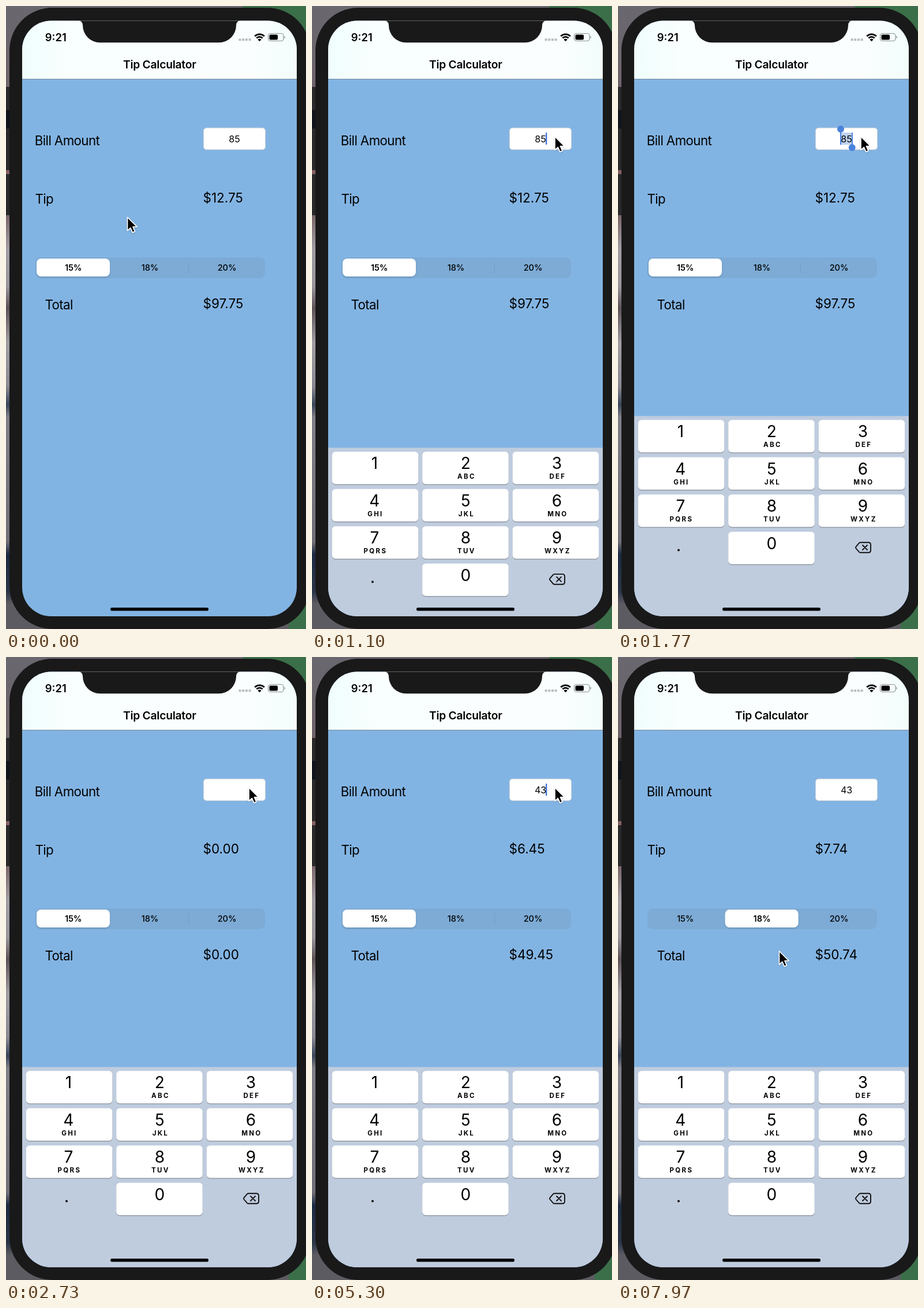
Recreate the animation shown at these times as an HTML page. Size 520 px wide and 1078 px high, loop 8 s.

```html
<!DOCTYPE html>
<html lang="en">
<head>
<meta charset="utf-8">
<title>Tip Calculator</title>
<style>
  html, body { margin: 0; width: 100%; height: 100%; overflow: hidden; }
  svg { display: block; width: 100vw; height: 100vh; font-family: Inter, Roboto, sans-serif; }
  .mid { text-anchor: middle; }
  .label { font-size: 22.3px; letter-spacing: -.6px; }
  .value { font-size: 22.5px; }
  .seg { font-size: 14.6px; font-weight: 500; letter-spacing: -.1px; }
  .seg .on { font-weight: 600; }
  .digit { font-size: 28px; }
  .letters { font-size: 11.5px; font-weight: 700; letter-spacing: 2.3px; }
</style>
</head>
<body>
<svg viewBox="0 0 520 1078">
  <defs>
    <linearGradient id="desk" x2="0" y2="1">
      <stop offset="0" stop-color="#69676f"/>
      <stop offset=".33" stop-color="#765f62"/>
      <stop offset=".39" stop-color="#a19da4"/>
      <stop offset=".45" stop-color="#99959c"/>
      <stop offset=".485" stop-color="#5d5358"/>
      <stop offset=".54" stop-color="#a19da3"/>
      <stop offset=".61" stop-color="#8b8993"/>
      <stop offset=".64" stop-color="#3a465c"/>
      <stop offset=".66" stop-color="#807f88"/>
      <stop offset=".86" stop-color="#706f78"/>
      <stop offset=".88" stop-color="#1c2b42"/>
      <stop offset=".94" stop-color="#2a3547"/>
      <stop offset=".96" stop-color="#5d5b62"/>
      <stop offset="1" stop-color="#5d5b62"/>
    </linearGradient>
    <linearGradient id="bar">
      <stop offset="0" stop-color="#f0fdfd"/>
      <stop offset=".16" stop-color="#f9fefe"/>
      <stop offset=".85" stop-color="#fafefe"/>
      <stop offset="1" stop-color="#f2fdfb"/>
    </linearGradient>
    <clipPath id="screen"><rect x="28" y="25.500" width="476" height="1030.500" rx="50"/></clipPath>
    <filter id="soft" x="-30%" y="-30%" width="160%" height="170%">
      <feDropShadow dx="0" dy="1.500" stdDeviation="1.500" flood-opacity=".16"/>
    </filter>
  </defs>

  <rect width="520" height="1078" fill="url(#desk)"/>
  <path fill="#29292b" d="M0 140H8V362H0z"/>
  <path fill="#10151b" d="M0 180H8V212H0z"/>
  <path fill="#855f61" d="M0 284H8V291H0z"/>
  <path fill="#3b6f49" d="M411 0H520V1078H490V90H411z"/>
  <rect x="6" y="3" width="521" height="1075" rx="74" fill="#191919"/>

  <g clip-path="url(#screen)">
    <rect x="28" y="25" width="476" height="1031" fill="#82b4e3"/>
    <rect x="28" y="25" width="476" height="101.500" fill="url(#bar)"/>
    <path d="M28 126.500H504" stroke="#75899a"/>
    <path fill="#191919" d="M125 25a8 8 0 0 1 8 8a30 30 0 0 0 30 30.300H369a30 30 0 0 0 30-30.300a8 8 0 0 1 8-8z"/>

    <text x="67.800" y="61" font-size="18.400" font-weight="600">9:21</text>
    <path d="M403.500 58.300h22" stroke="#babdbe" stroke-width="4" stroke-dasharray="4 1.700"/>
    <g fill="none" stroke="#000" stroke-width="2.800">
      <path d="M431.200 52.200a11.800 11.800 0 0 1 16.600 0"/>
      <path d="M434.300 55.600a7.400 7.400 0 0 1 10.400 0"/>
    </g>
    <path d="M436.300 58q3.200-2.500 6.400 0l-3.200 3.300z"/>
    <rect x="454.500" y="47.500" width="26.500" height="13" rx="4" fill="none" stroke="#8d9292" stroke-width="1.200"/>
    <rect x="456.500" y="49.500" width="14.500" height="9" rx="2"/>
    <path d="M482.500 51.500q3 2.500 0 5z" fill="#8d9292"/>
    <text class="mid" x="266.300" y="108" font-size="19.200" font-weight="600" letter-spacing="-.2">Tip Calculator</text>

    <text class="label" x="49.800" y="241">Bill Amount</text>
    <text class="label" x="50.500" y="342">Tip</text>
    <text class="label" x="67.500" y="525">Total</text>
    <text class="value" id="tip" x="341.500" y="340"/>
    <text class="value" id="total" x="341.500" y="523"/>

    <rect x="342.500" y="211" width="107" height="37.500" rx="5" fill="#fff" stroke="#d0d3d5"/>
    <rect id="mark" x="386" y="219" width="20" height="21" fill="#bfd2ee"/>
    <text class="mid" id="bill" x="396" y="235.500" font-size="16"/>
    <rect id="caret" y="219" width="2.300" height="21" rx="1" fill="#3f72d8"/>
    <g id="handles" fill="#4a82dc">
      <path d="M385 213h2v27h-2zM405 219h2v26h-2z"/>
      <circle cx="386" cy="213" r="6"/><circle cx="405.700" cy="245" r="6"/>
    </g>

    <rect x="51" y="435" width="398" height="36" rx="9" fill="#7dabd5"/>
    <path id="split" d="M316.500 444V462" stroke="#739fc8"/>
    <rect id="pill" x="53" y="437" width="127" height="31" rx="8" fill="#fff" filter="url(#soft)"/>
    <g class="seg mid">
      <text id="low" x="116.700" y="458">15%</text>
      <text id="high" x="249.500" y="458">18%</text>
      <text x="383" y="458">20%</text>
    </g>

    <g id="keyboard">
      <rect x="28" y="709.500" width="476" height="350" fill="#bfccde"/>
      <g id="keys"></g>
      <circle cx="105" cy="941.500" r="1.900"/>
      <path d="M420.500 928.200H434q4 0 4 4v9.600q0 4-4 4H420.500q-1.500 0-2.500-1l-5.500-6.300q-1.200-1.500 0-3l5.500-6.300q1-1 2.500-1zM424 933l8 8M432 933l-8 8" fill="none" stroke="#111" stroke-width="1.900" stroke-linecap="round"/>
    </g>
    <rect x="181" y="1041" width="170" height="5.600" rx="2.800"/>
  </g>

  <path id="mouse" d="M0 0V23.200L5.300 18.400 8.900 26.400 12.900 24.600 9.500 16.600H16.700z" stroke="#fff" stroke-width="1.600" stroke-linejoin="round" filter="url(#soft)"/>
</svg>
<script>
const LOOP = 8000;
const el = id => document.getElementById(id);
const clamp = v => Math.min(1, Math.max(0, v));
const ease = v => v * v * (3 - 2 * v);
const span = (t, from, to) => clamp((t - from) / (to - from));
const show = (id, opacity) => el(id).setAttribute('opacity', opacity);
const money = v => '$' + v.toFixed(2);

const letters = ['', 'ABC', 'DEF', 'GHI', 'JKL', 'MNO', 'PQRS', 'TUV', 'WXYZ'];
const key = (digit, col, row, sub, drop) => {
  const x = 34.8 + col * 156.4, y = 716.3 + row * 64.5, mid = 108.7 + col * 158;
  const cap = (top, fill) =>
    `<rect x="${x}" y="${top}" width="149.5" height="56.3" rx="6" fill="${fill}"/>`;
  return cap(y + 1.2, '#878e99') + cap(y, '#fff') +
    `<text class="digit mid" x="${mid - .3}" y="${y + drop}">${digit}</text>
    <text class="letters mid" x="${mid + 1.2}" y="${y + 47}">${sub}</text>`;
};
el('keys').innerHTML = letters.map((s, i) => key(i + 1, i % 3, Math.floor(i / 3), s, 30)).join('')
  + key(0, 1, 3, '', 30);

// Pointer moves: start, end, destination
const moves = [[150, 750, 421, 226], [5350, 6350, 238, 454], [7250, 7750, 279.5, 509]];

function pointer(t) {
  let x = 210.5, y = 365.5;
  for (const [from, to, toX, toY] of moves) {
    const p = ease(span(t, from, to));
    x += (toX - x) * p;
    y += (toY - y) * p;
  }
  return `translate(${x} ${y})`;
}

// Critically damped spring from 1 to 0
function keyboardGap(t) {
  const s = Math.max(0, t - 909) * .0172;
  return (1 + s) * Math.exp(-s);
}

function caretOpacity(t) {
  if (t < 900 || t >= 1200 && t < 2400) return 0;
  if (t < 1200) return 1;
  const p = t % 1000;
  return p < 400 ? span(p, 0, 180) : 1 - span(p, 480, 680);
}

function draw() {
  const t = performance.now() % LOOP;
  const bill = t < 2400 ? '85' : t < 3400 ? '' : t < 3750 ? '4' : '43';
  const tip = bill * (t < 6950 ? .15 : .18);
  const slide = ease(span(t, 6850, 7100));
  const selected = t >= 1200 && t < 2400 ? 1 : 0;

  el('bill').textContent = bill;
  el('tip').textContent = money(tip);
  el('total').textContent = money(+bill + tip);
  el('caret').setAttribute('x', 395 + bill.length * 5);
  show('caret', caretOpacity(t));
  show('mark', selected);
  show('handles', selected);
  el('pill').setAttribute('x', 53 + 132.6 * slide);
  el('low').classList.toggle('on', slide < .5);
  el('high').classList.toggle('on', slide >= .5);
  show('split', 1 - slide);
  el('keyboard').setAttribute('transform', `translate(0 ${347 * keyboardGap(t)})`);
  el('mouse').setAttribute('transform', pointer(t));
  requestAnimationFrame(draw);
}
draw();
</script>
</body>
</html>
```
